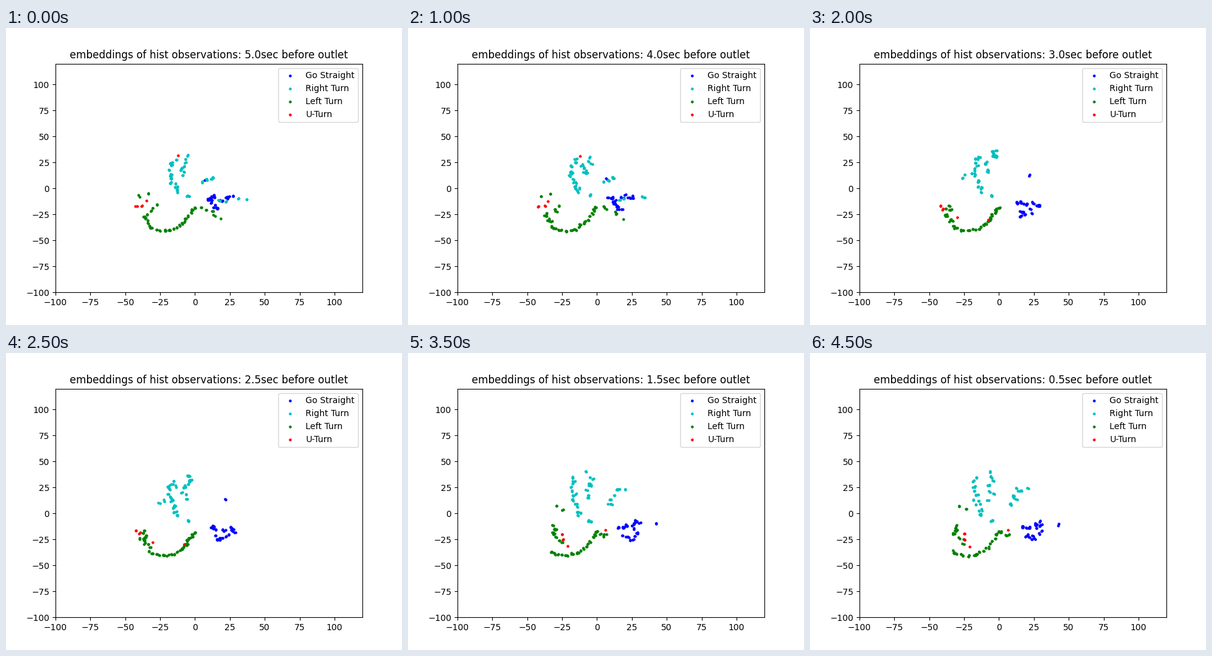
These frames come from a looping animation (640 px wide and 480 px high, 5000 ms). A matplotlib script:

```python
import numpy as np
import matplotlib.pyplot as plt
from matplotlib.animation import FuncAnimation

STEPS = 10


class Strand:
    """n dots in small clumps along a bent line that passes through up to three poses."""

    def __init__(self, n, width, *poses):
        self.n, self.width = n, width
        self.poses = [np.array(pose, float) for pose in poses]

    def line(self, step):
        """Hold the early pose, drift to the middle one, then jump to the late one."""
        last = len(self.poses) - 1
        phase = np.interp(step, [2, 4, 6, 7], [0, 0.5, 0.5, 1]) * last
        i = min(int(phase), max(last - 1, 0))
        a, b = self.poses[i], self.poses[min(i + 1, last)]
        return a + (b - a) * (phase - i)

    def dots(self, step, seed):
        still = np.random.default_rng(seed)
        moving = np.random.default_rng([seed, step])
        keys = self.line(step)
        m = int(np.ceil(self.n / 2.2))
        u = (np.arange(m) + still.uniform(0.2, 0.8, m)) / m * (len(keys) - 1)
        hubs = np.column_stack([np.interp(u, range(len(keys)), axis) for axis in keys.T])
        hubs += self.width * (0.6 * still.uniform(-1, 1, (m, 2))
                              + 0.8 * moving.uniform(-1, 1, (m, 2)))
        owner = np.arange(self.n) % m
        twins = np.arange(self.n) >= m
        return hubs[owner] + twins[:, None] * moving.normal(0, 0.6, (self.n, 2))


straight = [
    Strand(26, 2.2, [(8, -7), (17, -10), (28, -7)],
           [(10, -12), (20, -15), (30, -18)],
           [(15, -13), (25, -13), (30, -8)]),
    Strand(16, 1.8, [(11, -11), (14, -16), (17, -21)],
           [(15, -21), (17, -27), (25, -20)],
           [(18, -20), (25, -25), (30, -17)]),
    Strand(2, 0.5, [(7, 8)], [(22, 13)], [(43, -10)]),
]
right = [
    Strand(34, 1.8, [(-14, 30), (-20, 15), (-16, 5), (-12, -5)],
           [(-17, 35), (-18, 19), (-15, 7), (-12, -5)]),
    Strand(18, 2.2, [(-3, 31), (-10, 21), (-8, 12)],
           [(-3, 35), (-8, 25), (-8, 13)],
           [(-6, 40), (-5, 29), (-8, 12)]),
    Strand(5, 0.8, [(-5, -7)]),
    Strand(10, 1.8, [(6, 6), (10, 9), (13, 12)],
           [(-3, 30), (-3, 33), (-4, 37)],
           [(7, 8), (12, 18), (15, 27)]),
    Strand(8, 2.5, [(12, -13), (22, -9), (42, -9)],
           [(-28, 8), (-22, 16), (-12, 34)],
           [(5, 4), (12, 20), (22, 25)]),
]
left = [
    Strand(40, 0.8, [(1, -16), (-5, -27), (-9, -33), (-15, -39.5),
                     (-21, -40.5), (-29, -40), (-33, -36)]),
    Strand(18, 1.4, [(-25, -15.5), (-37, -26), (-33, -34)],
           [(-35, -17), (-37, -26), (-33, -33)],
           [(-30, -12), (-32, -18), (-25, -30)]),
    Strand(9, 1.2, [(3, -17), (12, -22), (20, -31)],
           [(-2, -21), (-6, -29), (-11, -35)],
           [(0, -17), (5, -20), (8, -21)]),
    Strand(4, 0.8, [(-41, -9), (-30, -3)], [(-40, -27), (-36, -15)],
           [(-31, 8), (-20, 2)]),
]
uturn = [
    Strand(5, 0.6, [(-44, -18), (-37, -16), (-33, -8)],
           [(-43, -15), (-40, -20), (-20, -36)],
           [(-24, -17), (-25, -26), (-18, -38)]),
    Strand(1, 0.3, [(-12.5, 31.5)], [(-8, -30)], [(6, -16)]),
]
GROUPS = [("Go Straight", "b", straight), ("Right Turn", "c", right),
          ("Left Turn", "g", left), ("U-Turn", "r", uturn)]

fig, ax = plt.subplots(figsize=(6.4, 4.8), dpi=100)
ax.set_xlim(-100, 120)
ax.set_ylim(-100, 120)
ticks = range(-100, 101, 25)
ax.set_xticks(ticks)
ax.set_yticks(ticks)
clouds = [ax.scatter([], [], s=5, c=color, label=label) for label, color, _ in GROUPS]
ax.legend(loc="upper right")
title = ax.set_title("")


def draw(step):
    for cloud, (_, _, strands) in zip(clouds, GROUPS):
        cloud.set_offsets(np.vstack([s.dots(step, seed) for seed, s in enumerate(strands)]))
    title.set_text(f"embeddings of hist observations: {5 - step / 2:.1f}sec before outlet")
    return [*clouds, title]


anim = FuncAnimation(fig, draw, frames=STEPS, interval=500, repeat=True,
                     repeat_delay=0, init_func=lambda: draw(0), blit=False)
plt.show()
```
